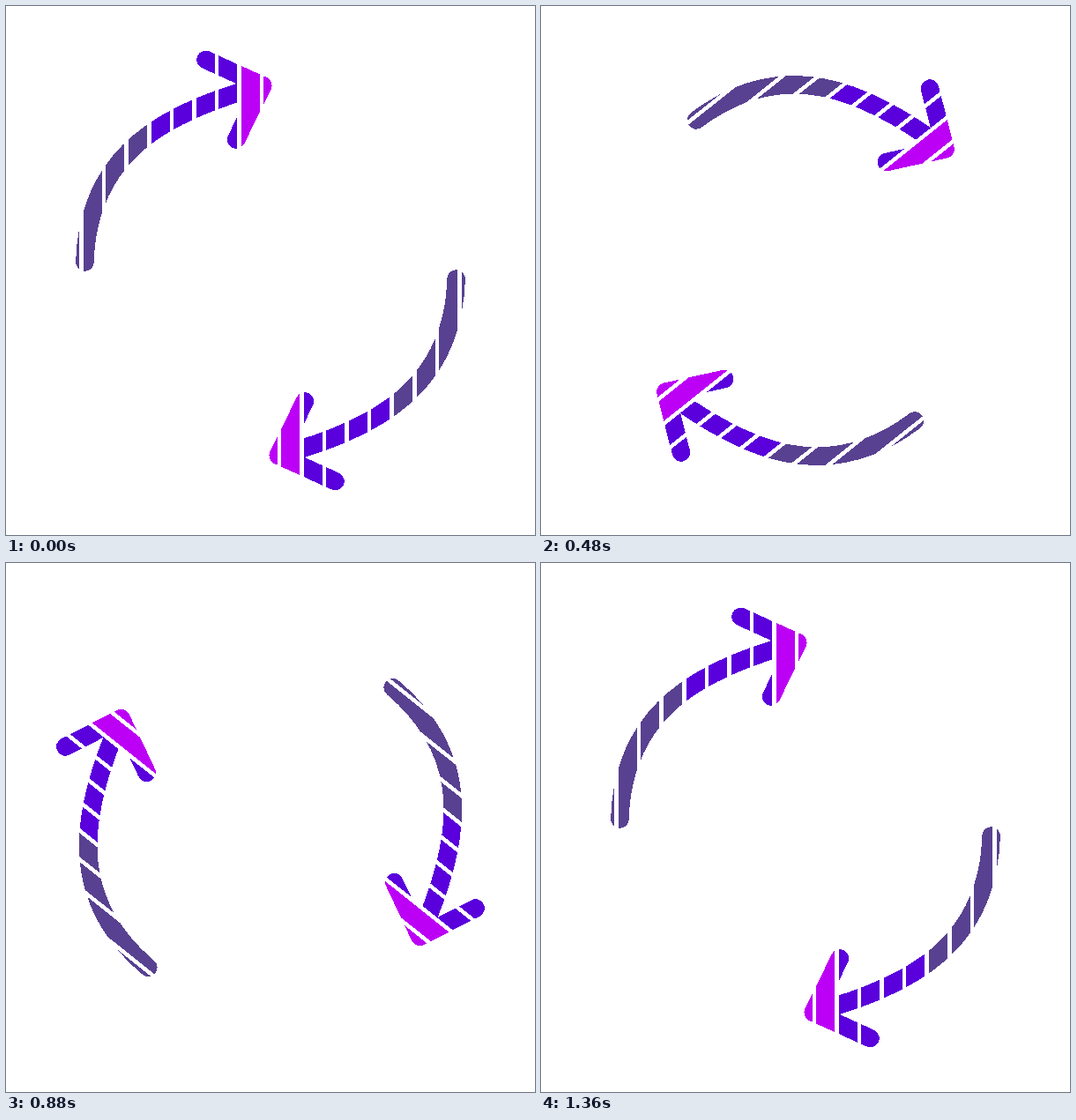
These frames come from a looping animation (600 px wide and 600 px high, 2560 ms). An HTML page:

```html
<!DOCTYPE html>
<html lang="en">
<head>
<meta charset="utf-8">
<title>Turning arrows</title>
<style>
  html, body { margin: 0; width: 100%; height: 100%; overflow: hidden; background: #fff; }
  svg { display: block; width: 100vw; height: 100vh; }
</style>
</head>
<body>
<svg viewBox="0 0 600 600" shape-rendering="crispEdges">
  <defs>
    <linearGradient id="bands" gradientUnits="userSpaceOnUse" x1="0" y1="0" x2="600" y2="0">
      <stop offset="0.27" stop-color="#594191"/>
      <stop offset="0.27" stop-color="#5a00dc"/>
      <stop offset="0.44" stop-color="#5a00dc"/>
      <stop offset="0.44" stop-color="#bc00f5"/>
    </linearGradient>
    <g id="arrow" fill="none">
      <path stroke="url(#bands)" stroke-width="20.6" stroke-linecap="round" stroke-linejoin="round"
        d="M89.4 290.5C93 167 180.5 119.8 291.2 90.3M226.6 61L291.2 90.3L261.1 151.5"/>
      <path fill="#bc00f5" d="M265 98V122L282 98Z"/>
      <path id="gaps" stroke="#fff" stroke-width="4.5"/>
    </g>
  </defs>
  <g id="pair">
    <use href="#arrow"/>
    <use href="#arrow" transform="rotate(180 300 300)"/>
  </g>
</svg>
<script>
  const LOOP = 2560, TURN = 1360, STEP = 40;
  const GAP_START = 85.7, GAP_PITCH = 25.52, GAP_COUNT = 9;

  const pair = document.getElementById('pair');
  const gapPath = Array.from({ length: GAP_COUNT }, (_, i) =>
    `M${(GAP_START + i * GAP_PITCH).toFixed(2)} 40V310`).join('');
  document.getElementById('gaps').setAttribute('d', gapPath);

  const ease = p => p * p * (3 - 2 * p);

  function draw(ms) {
    const time = Math.floor((ms % LOOP) / STEP) * STEP;
    const angle = 180 * ease(Math.min(time / TURN, 1));
    pair.setAttribute('transform', `rotate(${angle.toFixed(3)} 300 300)`);
  }

  const start = performance.now();
  function tick() {
    draw(performance.now() - start);
    requestAnimationFrame(tick);
  }
  tick();
</script>
</body>
</html>
```
